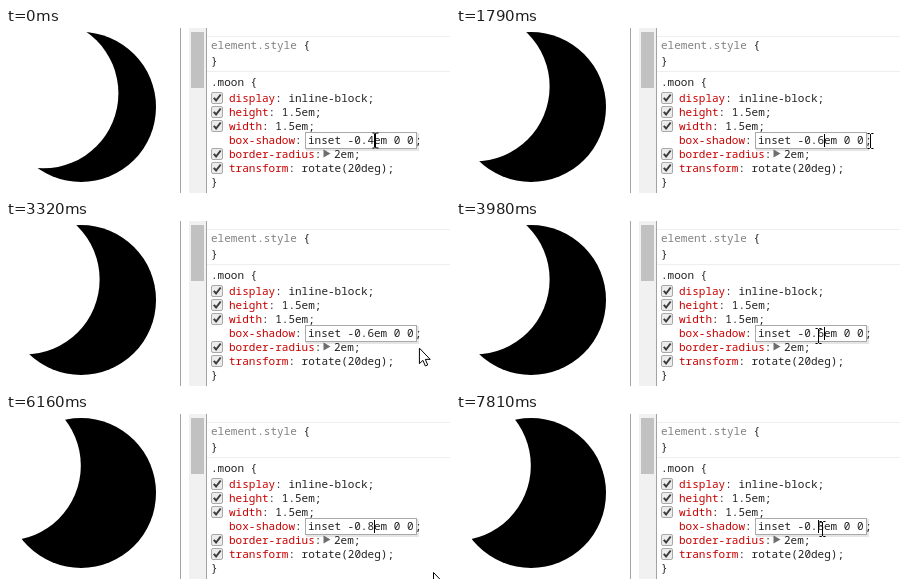
Write an HTML page that moves like this. It is 444 px wide and 165 px high and loops after 8 s.

```html
<!DOCTYPE html>
<html lang="en">
<head>
<meta charset="utf-8">
<title>Moon shadow</title>
<style>
  html, body { margin: 0; width: 100%; height: 100%; overflow: hidden; background: #fff; }
  svg { display: block; width: 444px; height: 165px; }
  text { font: 11px "Noto Sans Mono", "DejaVu Sans Mono", monospace; white-space: pre; fill: #222; }
  .name { fill: #c80000; }
  .dim { fill: #808080; }
</style>
</head>
<body>
<svg viewBox="0 0 444 165">
  <defs>
    <g id="check">
      <rect x=".5" y=".5" width="11" height="11" rx="1.5" fill="#ececec" stroke="#a8a8a8"/>
      <path d="M2.8 5.8L5.1 8.5L9.7 2.5" fill="none" stroke="#3c3c3c" stroke-width="2"/>
    </g>
  </defs>
  <circle cx="75" cy="79" r="75"/>
  <circle id="hole" r="75" fill="#fff"/>
  <g shape-rendering="crispEdges">
    <rect x="174" width="1" height="165" fill="#a3a3a3"/>
    <rect x="183" width="17" height="165" fill="#f1f1f1"/>
    <rect x="185" y="4" width="13" height="56" fill="#c1c1c1"/>
    <rect x="200" width="1" height="165" fill="#a3a3a3"/>
    <rect x="201" y="8" width="243" height="1" fill="#eee"/>
    <rect x="201" y="43" width="243" height="1" fill="#eee"/>
  </g>
  <g id="rules"></g>
  <path d="M317.5 121.5V129.5L324.5 125.5Z" fill="#6e6e6e"/>
  <rect x="300" y="105" width="113" height="18" fill="#000" opacity=".1"/>
  <rect x="299.5" y="104.5" width="111" height="16" fill="#fff" stroke="#a9a9a9"/>
  <rect id="pick" x="362" y="106" width="6" height="14" fill="#3390ff"/>
  <text x="302" y="116">inset -0.<tspan id="digit">4</tspan>em 0 0</text>
  <rect id="caret" y="106" width="1" height="13"/>
  <path id="beam" fill="none" stroke="#000"
    d="M-3 -7.5H-1L0 -6.5L1 -7.5H3M0 -7V7M-3 7.5H-1L0 6.5L1 7.5H3"/>
  <path id="arrow" fill="#fff" stroke="#000" stroke-linejoin="round"
    d="M.5 .5V16L4 12.7L6.4 18.3L8.8 17.3L6.4 11.7H11.3Z"/>
</svg>
<script>
const LOOP = 8000, STEP = 130, BLINK = 490, TILT = 20 * Math.PI / 180;
const DRAGS = [150, 4560];   // the digit gets selected
const EDITS = [1790, 6160];  // the digit gets retyped
const CLICK = 7540;          // the caret is put before the digit

// Pointer moves: start time, number of steps, destination
const moves = [
  [0, 1, 369.5, 112.5],
  [150, 2, 366.5, 113],
  [1520, 1, 414.5, 113],
  [2350, 3, 365.5, 118],
  [3050, 1, 423, 129],
  [3200, 6, 362.5, 115],
  [4250, 5, 370.5, 114],
  [5740, 1, 371, 128],
  [5890, 3, 427, 158],
  [6690, 5, 363.5, 116],
  [7540, 3, 366.5, 115]
];

const $ = id => document.getElementById(id);
const hole = $('hole'), pick = $('pick'), digit = $('digit');
const caret = $('caret'), beam = $('beam'), arrow = $('arrow');
const show = (el, on) => el.setAttribute('visibility', on ? 'visible' : 'hidden');

const put = (x, y, value, cls = '') => `<text x="${x}" y="${y}" class="${cls}">${value}</text>`;
const declarations = [
  ['display', ' inline-block;'], ['height', ' 1.5em;'], ['width', ' 1.5em;'],
  ['box-shadow', ''], ['border-radius', ''], ['transform', ' rotate(20deg);']
];

function declaration([name, value], i) {
  const y = 74 + i * 14;
  const box = name === 'box-shadow' ? '' : `<use href="#check" x="205" y="${y - 10}"/>`;
  return box + put(223, y, `<tspan class="name">${name}</tspan>:${value}`);
}

$('rules').innerHTML =
  put(205, 21, 'element.style <tspan fill="#222">{</tspan>', 'dim') +
  put(205, 37, '}') +
  put(205, 58, '.moon {') +
  declarations.map(declaration).join('') +
  put(409, 116, ';') +
  put(328, 130, '2em;') +
  put(205, 158, '}');

function pointer(t) {
  let x = 0, y = 0;
  for (const [start, steps, toX, toY] of moves) {
    if (t < start) break;
    const p = Math.min(1, (Math.floor((t - start) / STEP) + 1) / steps);
    x += (toX - x) * p;
    y += (toY - y) * p;
  }
  return { x, y };
}

function draw(t) {
  const tenths = 4 + 2 * EDITS.filter(e => t >= e).length;
  hole.setAttribute('cx', 75 - tenths * 10 * Math.cos(TILT));
  hole.setAttribute('cy', 79 - tenths * 10 * Math.sin(TILT));

  const picked = EDITS.some((e, i) => t >= DRAGS[i] && t < e);
  digit.textContent = tenths;
  digit.setAttribute('fill', picked ? '#fff' : '#222');
  show(pick, picked);

  // Blinking restarts at each edit or click
  const restart = [0, ...EDITS, CLICK].filter(s => s <= t).pop();
  show(caret, !picked && (t - restart) % (2 * BLINK) < BLINK);
  caret.setAttribute('x', t < CLICK ? 368 : 362);

  // The text cursor turns into an arrow below the edit field
  const { x, y } = pointer(t);
  const isArrow = y > 120;
  show(arrow, isArrow);
  show(beam, !isArrow);
  (isArrow ? arrow : beam).setAttribute('transform', `translate(${x} ${y})`);
}

const start = performance.now();
function tick() {
  draw((performance.now() - start) % LOOP);
  requestAnimationFrame(tick);
}
tick();
</script>
</body>
</html>
```
